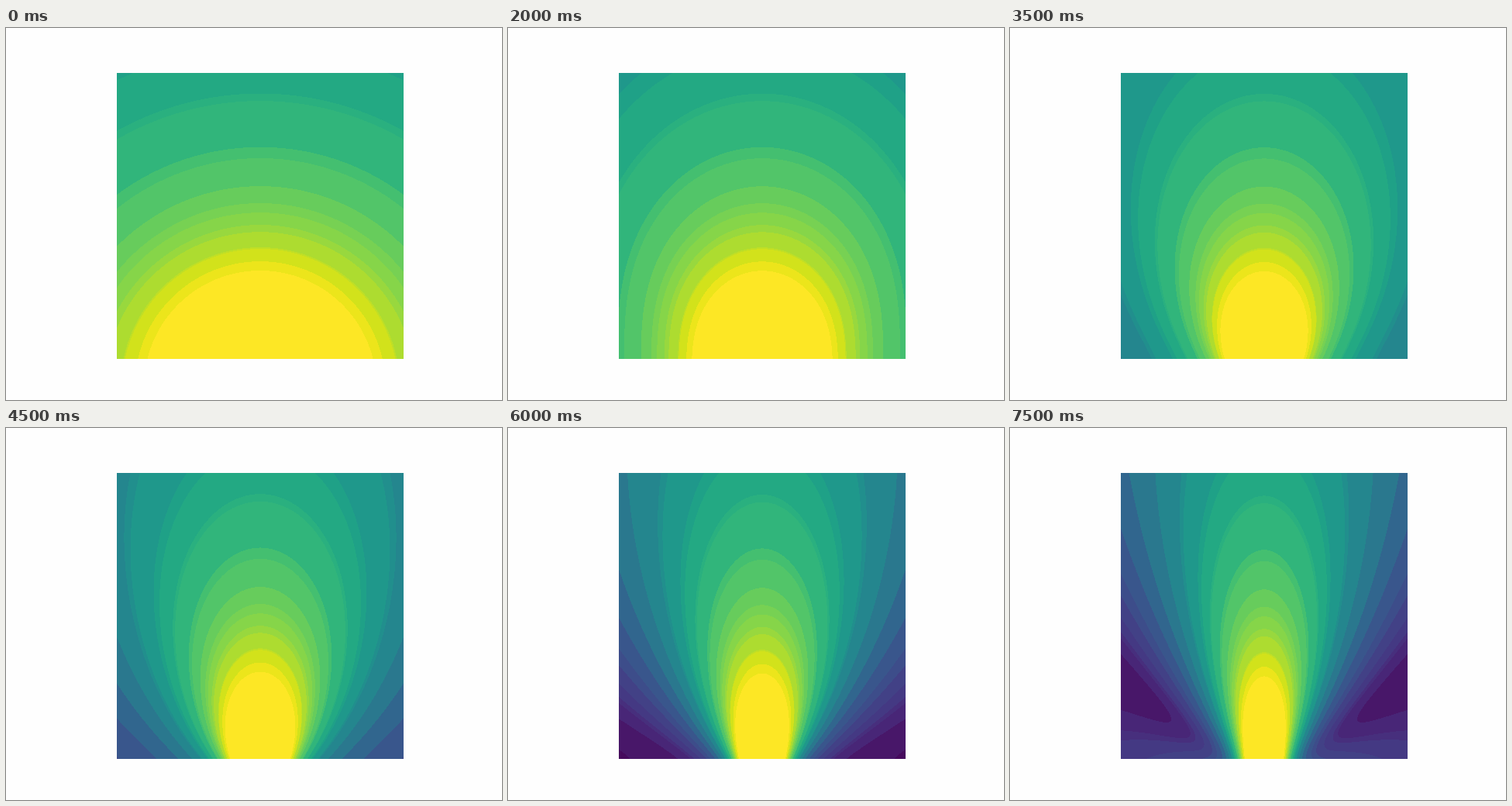
These frames come from a looping animation (640 by 480 pixels, 8 s). An HTML page with a canvas:

```html
<!DOCTYPE html>
<html>
<head>
<meta charset="utf-8">
<style>
  html, body { margin: 0; width: 100%; height: 100%; overflow: hidden; background: #fefefe; }
  canvas { position: absolute; left: 143px; top: 58px; }
</style>
</head>
<body>
<canvas id="field" width="370" height="369"></canvas>
<script>
// Sound field of a growing line of in-phase point sources below the picture.
const W = 370, H = 369;
const BASE = 36;       // distance from the sources to the lower edge
const GAP = 5.8;       // spacing of neighbouring sources
const K = 0.0845;      // wave number per pixel
const GAIN = 12.1;
const STEPS = 16, STEP_MS = 500;

// Lower bound of each level and its colour, weakest first.
const bands = [
  [0, '460a5d'], [.035, '481769'], [.085, '482677'], [.122, '472f7d'],
  [.137, '443983'], [.17, '424186'], [.215, '3d4d8a'], [.253, '39568c'],
  [.311, '31668e'], [.373, '2a788e'], [.437, '24868e'], [.498, '218f8d'],
  [.51, '1f988b'], [.563, '1fa187'], [.579, '23a983'], [.622, '2ab07f'],
  [.63, '31b57b'], [.688, '44bf70'], [.7045, '52c569'], [.752, '67cc5c'],
  [.786, '77d153'], [.807, '86d549'], [.837, '98d83e'], [.856, 'addc30'],
  [.902, 'c0df25'], [.907, 'd2e21b'], [.951, 'ece51b'], [.988, 'fde725']
].map(([min, hex]) => {
  const n = parseInt(hex, 16);
  return { min, rgba: (255 << 24 | (n & 255) << 16 | (n & 0xff00) | n >> 16) >>> 0 };
});

const ctx = document.getElementById('field').getContext('2d');
const image = ctx.createImageData(W, H);
const pixels = new Uint32Array(image.data.buffer);

function level(x, y, count) {
  let re = 0, im = 0;
  for (let s = 0; s < count; s++) {
    const dx = x - (s - (count - 1) / 2) * GAP;
    const r = Math.sqrt(dx * dx + y * y), amp = 1 / Math.sqrt(r);
    re += amp * Math.cos(K * r);
    im += amp * Math.sin(K * r);
  }
  return GAIN * Math.sqrt(re * re + im * im) / count;
}

function colour(v) {
  let i = bands.length - 1;
  while (v < bands[i].min) i--;
  return bands[i].rgba;
}

function draw(count) {
  for (let row = 0; row < H; row++) {
    const y = BASE + H - row - 0.5;
    for (let col = 0; col < W / 2; col++) {
      const c = colour(level(col + 0.5 - W / 2, y, count));
      pixels[row * W + col] = pixels[row * W + W - 1 - col] = c;
    }
  }
  ctx.putImageData(image, 0, 0);
}

let shown = 0;
function tick(now) {
  const count = 1 + Math.floor(now / STEP_MS) % STEPS;
  if (count !== shown) draw(shown = count);
  requestAnimationFrame(tick);
}
requestAnimationFrame(tick);
</script>
</body>
</html>
```
